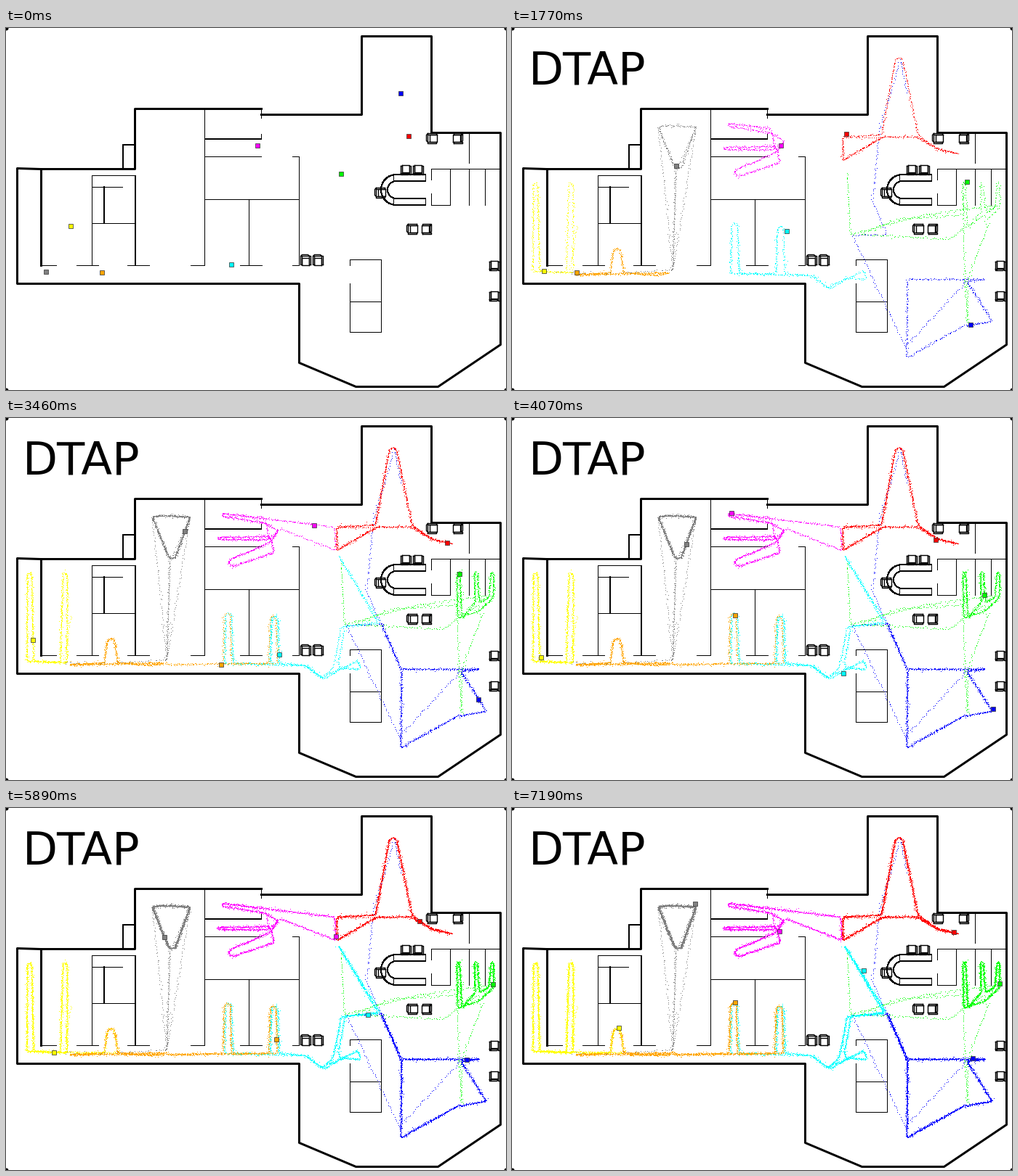
A matplotlib script for the animation above (7220 ms loop, 688 by 499 pixels).

```python
import numpy as np
import matplotlib.pyplot as plt
from matplotlib.animation import FuncAnimation
from matplotlib.collections import LineCollection

W, H, DPI = 688, 499, 128
PX = 72 / DPI                      # points per pixel
FRAMES, STEP = 190, 38
SPEED, DOTS, SPREAD = 34, 12, 0.6  # px per frame, dots per frame, jitter
KEYS = [0, 46, 107, 189]           # frames at which the duties change
rng = np.random.default_rng(7)

fig = plt.figure(figsize=(W / DPI, H / DPI), dpi=DPI, facecolor="white")
ax = fig.add_axes([0, 0, 1, 1])
ax.set(xlim=(0, W), ylim=(H, 0))
ax.axis("off")


# ---------- floor plan, points are complex x + yj ----------
def strokes(paths, width, smooth=False):
    shift = 0.5 + 0.5j if smooth else 0
    paths = [np.asarray(p) + shift for p in paths]
    ax.add_collection(LineCollection([np.c_[p.real, p.imag] for p in paths],
                                     colors="black", linewidths=width * PX,
                                     antialiaseds=smooth, capstyle="projecting"))


def box(a, b):
    return [a, complex(b.real, a.imag), b, complex(a.real, b.imag), a]


strokes([
    [351 + 119j, 489 + 119j, 489 + 11j, 585 + 11j, 585 + 144j, 680 + 144j, 680 + 436j,
     594 + 494j, 481 + 494j, 403 + 461j, 403 + 352j, 15 + 352j, 15 + 193j, 47 + 194j,
     177 + 194j, 177 + 111j, 351 + 111j],
    [47 + 194j, 47 + 326j]], 3, True)
strokes([
    [177 + 161j, 161 + 161j, 161 + 194j], [274 + 153j, 351 + 153j],
    [178 + 204j, 178 + 326j], [135 + 219j, 135 + 269j]], 2)
strokes([
    [273 + 111j, 273 + 327j, 254 + 327j], [351 + 111j, 351 + 124j],
    [351 + 146j, 351 + 153j], [273 + 177j, 351 + 177j],
    [394 + 177j, 403 + 177j, 403 + 327j, 394 + 327j],
    [273 + 236j, 403 + 236j], [334 + 236j, 334 + 327j],
    [178 + 203j, 118 + 203j, 118 + 327j], [118 + 219j, 160 + 219j],
    [118 + 269j, 178 + 269j], [48 + 327j, 69 + 327j]], 1)
strokes([[x - 15 + 327j, x + 15 + 327j] for x in (112, 182, 337)], 1)
strokes([[x + 194j, x + 244j] for x in (611, 637, 659)], 1)
strokes([
    [637 + 144j, 637 + 186j], [680 + 194j, 585 + 194j, 585 + 209j],
    [585 + 228j, 585 + 244j, 611 + 244j], [473 + 327j, 473 + 319j, 516 + 319j, 516 + 377j],
    [473 + 352j, 473 + 377j], box(473 + 377j, 516 + 419j)], 1)

# curved desk
arc = -1j * np.exp(-1j * np.linspace(0, np.pi, 40))
for r in (21, 12):
    bend = 537 + 223j + r * arc
    strokes([[577 + bend[0].imag * 1j, *bend, 577 + bend[-1].imag * 1j]], 1)
strokes([[x + y * 1j, x + (y + 9) * 1j] for x in (533, 577) for y in (202, 235)], 1)

SEAT = [box(-5 - 6j, 5 + 4j), box(-7 - 5j, -5 + 7j), box(5 - 5j, 7 + 7j),
        [-6 + 6j, -4 + 8j, 4 + 8j, 6 + 6j, -6 + 6j]]
DOWN, LEFT, UP, RIGHT = 1, 1j, -1, -1j
for spot, facing in [(586 + 151j, LEFT), (620 + 151j, RIGHT), (549 + 194j, DOWN),
                     (566 + 194j, DOWN), (515 + 226j, LEFT), (559 + 276j, LEFT),
                     (577 + 276j, RIGHT), (411 + 320j, UP), (428 + 320j, UP),
                     (671 + 326j, DOWN), (671 + 368j, DOWN)]:
    strokes([spot + np.array(p) * facing for p in SEAT], 1.4, True)

ax.plot([0, W, 0, W], [0, 0, H, H], "o", color="black", ms=6 * PX, mew=0)
title = ax.text(23.3, 77.5, "DTAP", family="DejaVu Sans", size=62.4 * PX, va="baseline")


# ---------- patrol routes ----------
def length(pts):
    return np.abs(np.diff(pts)).sum()


def resample(pts, n):
    s = np.r_[0, np.cumsum(np.abs(np.diff(pts)))]
    return np.interp(np.linspace(0, s[-1], n), s, pts)


def finger(root, tip, w=3, flare=1.5):
    """Narrow detour from root round tip and back, wider at the root."""
    u = (tip - root) / abs(tip - root)
    n = 1j * u * w
    return [root - flare * n, tip - 3 * u - n, tip, tip - 3 * u + n, root + flare * n]


def ring_of(loop, soft=7):
    closed = loop + loop[:1]
    ring = resample(closed, int(length(closed)))[:-1]
    return np.mean([np.roll(ring, k) for k in range(-(soft // 2), soft // 2 + 1)], axis=0)


def leg(head, goal, loop, frames):
    """Follow head, then circle the loop at patrol speed, ending at goal."""
    ring = ring_of(loop)
    size = len(ring)
    first = np.argmin(abs(ring - head[-1]))
    run = (np.argmin(abs(ring - goal)) - first) % size
    laps = max(0, round((SPEED * frames - length(head) - run) / size))
    lap = ring[np.arange(first, first + run + laps * size + 1) % size]
    return resample([*head, *lap, goal], frames * DOTS + 1)


def patrol(stops, loops, lead):
    track = np.array(stops[:1])
    for k, loop in enumerate(loops):
        head = [stops[k]] + (lead if k == 0 else [])
        track = np.r_[track, leg(head, stops[k + 1], loop, KEYS[k + 1] - KEYS[k])[1:]]
    return track


west = finger(33 + 336j, 32 + 213j) + finger(79 + 338j, 81 + 213j)
alcove = finger(144 + 338j, 144 + 304j, 5, 1.8)
yellow = patrol([89 + 273j, 44 + 335j, 40 + 330j, 147 + 303j],
                [west, west, west + alcove], [80 + 335j])

office, study = finger(304 + 339j, 304 + 269j, 4), finger(367 + 339j, 367 + 273j, 4)
hall = [215 + 341j, 220 + 336j, 226 + 341j]
orange = patrol([132 + 337j, 89 + 337j, 307 + 272j, 307 + 268j],
                [[86 + 341j] + alcove + [200 + 342j, 217 + 338j],
                 [86 + 341j] + alcove + hall + office + study,
                 [160 + 341j] + hall + office + study], [120 + 341j])

wedge = [201 + 137j, 215 + 135j, 253 + 137j, 232 + 194j, 224 + 194j]
foot, neck = 221 + 334j, 225 + 198j
grey = patrol([55 + 336j, 226 + 190j, 240 + 174j, 252 + 132j], [wedge] * 3,
              [120 + 340j, foot, neck, wedge[0], foot, neck, wedge[2], foot, neck])

upper = finger(355 + 142j, 296 + 134j, 2)
lower = finger(362 + 166j, 289 + 167j, 1.5) + finger(366 + 179j, 306 + 202j, 5) + [374 + 156j]
annex = [452 + 151j, 454 + 183j, 376 + 153j]
magenta = patrol([346 + 162j, 370 + 162j, 302 + 131j, 368 + 170j],
                 [upper + lower, upper + annex + lower, upper + annex + lower], [366 + 163j])

east = [585 + 168j, 614 + 174j, 585 + 167j, 558 + 151j]
beat = [455 + 151j, *finger(533 + 148j, 532 + 41j, 5, 5), *east, 510 + 151j, 455 + 183j]
red = patrol([554 + 149j, 460 + 146j, 583 + 168j, 608 + 171j], [beat] * 3,
             east + [455 + 152j, 455 + 183j, 510 + 151j])

square = [544 + 347j, 652 + 347j, 626 + 350j, 660 + 405j, 620 + 412j, 543 + 455j]
spur = [544 + 350j, 515 + 282j]
blue = patrol([543 + 90j, 631 + 409j, 662 + 401j, 634 + 345j],
              [square, square + spur, square + spur],
              [534 + 45j, 505 + 140j, 496 + 240j, 515 + 285j, 468 + 287j, 541 + 440j,
               625 + 350j])

fork = (finger(624 + 276j, 622 + 212j, 2) + finger(648 + 255j, 646 + 212j, 2)
        + finger(667 + 248j, 669 + 212j, 2) + [650 + 267j])
stem = [655 + 272j, 626 + 350j, 627 + 410j, 623 + 350j]
green = patrol([461 + 201j, 626 + 212j, 650 + 244j, 671 + 242j], [fork + stem, fork, fork],
               [465 + 285j, 570 + 258j, 668 + 245j, 600 + 292j, 480 + 285j, 530 + 264j,
                620 + 258j])

ramp = [412 + 342j, 434 + 359j]
hook = [460 + 345j, 488 + 347j, 484 + 335j, 458 + 348j, 437 + 360j]
climb = [450 + 345j, 461 + 288j, 512 + 284j, 457 + 190j, 514 + 282j, 466 + 288j, 457 + 338j]
cyan = patrol([310 + 326j, 378 + 280j, 456 + 352j, 484 + 224j],
              [[z + 2 for z in office + study] + ramp + hook + ramp[:1],
               [z + 3 for z in study] + ramp + climb + hook + ramp[:1],
               ramp[1:] + climb + hook], [318 + 340j])

# ---------- moving parts ----------
CREW = [(grey, "#808080"), (green, "#00ff00"), (blue, "#0000ff"), (cyan, "#00ffff"),
        (orange, "#ffa500"), (yellow, "#ffff00"), (magenta, "#ff00ff"), (red, "#ff0000")]
parts = []
for track, color in CREW:
    dust = track + rng.laplace(0, SPREAD, (len(track), 2)) @ [1, 1j]
    trail, = ax.plot([], [], ",", color=color, zorder=3)
    body, = ax.plot([], [], "s", ms=6 * PX, mfc=color, mec="#404040", mew=0.8 * PX, zorder=4)
    parts.append((track, dust, trail, body))


def draw(i):
    n = i * DOTS
    title.set_visible(i > 0)
    for track, dust, trail, body in parts:
        trail.set_data(dust.real[:n], dust.imag[:n])
        body.set_data([track[n].real], [track[n].imag])


anim = FuncAnimation(fig, draw, frames=FRAMES, interval=STEP, repeat=True, repeat_delay=0)
plt.show()
```
